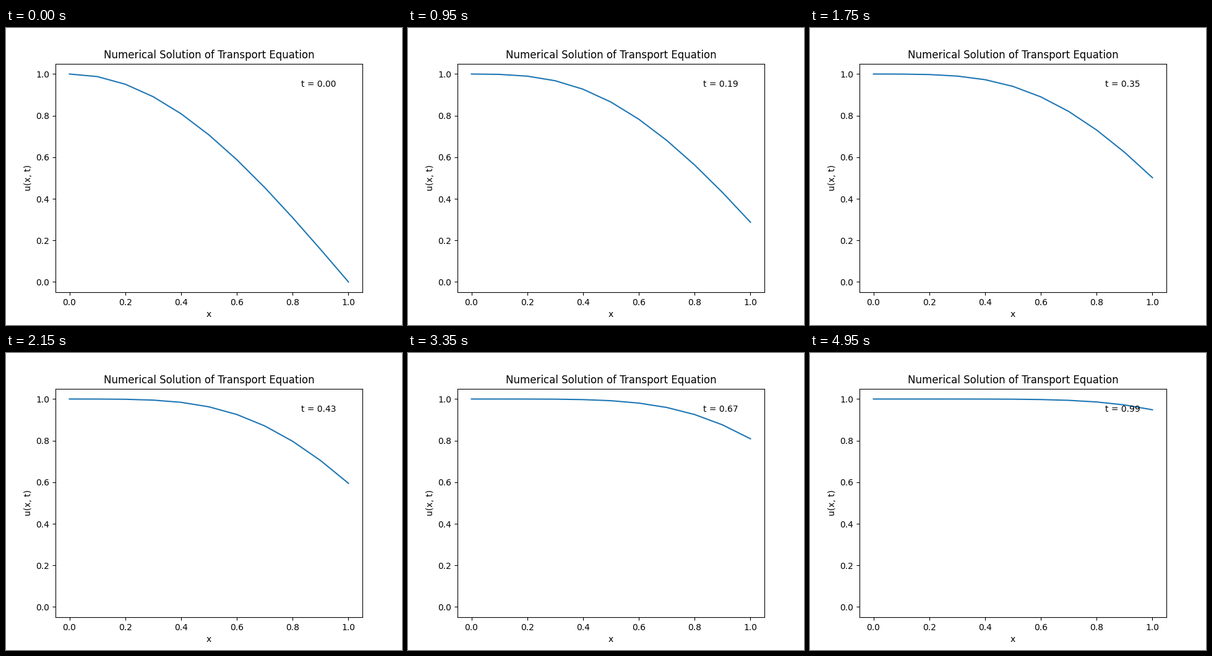
These frames come from a looping animation (640x480 px, 5 s). A matplotlib script:

```python
import matplotlib.pyplot as plt
import numpy as np
from matplotlib.animation import FuncAnimation

FRAMES, INTERVAL = 100, 50
DT, CELLS = 0.01, 10
COURANT = DT * CELLS

plt.rcParams["font.family"] = "DejaVu Sans"


def solve(x):
    """Upwind scheme for u_t + u_x = 0 with u(0, t) = 1."""
    u = np.cos(np.pi * x / 2)
    states = [u]
    for _ in range(FRAMES - 1):
        u = u.copy()
        u[1:] -= COURANT * np.diff(u)
        states.append(u)
    return states


x = np.linspace(0, 1, CELLS + 1)
states = solve(x)

fig, ax = plt.subplots(figsize=(6.4, 4.8), dpi=100)
line, = ax.plot(x, states[0], color="#1f77b4", lw=1.5)
ax.set(xlim=(-0.05, 1.05), ylim=(-0.05, 1.05), xlabel="x", ylabel="u(x, t)",
       title="Numerical Solution of Transport Equation")
clock = ax.text(0.8, 0.9, "", transform=ax.transAxes)


def update(n):
    line.set_ydata(states[n])
    clock.set_text(f"t = {n * DT:.2f}")
    return line, clock


anim = FuncAnimation(fig, update, frames=FRAMES, interval=INTERVAL,
                     repeat=True, repeat_delay=0)
plt.show()
```
